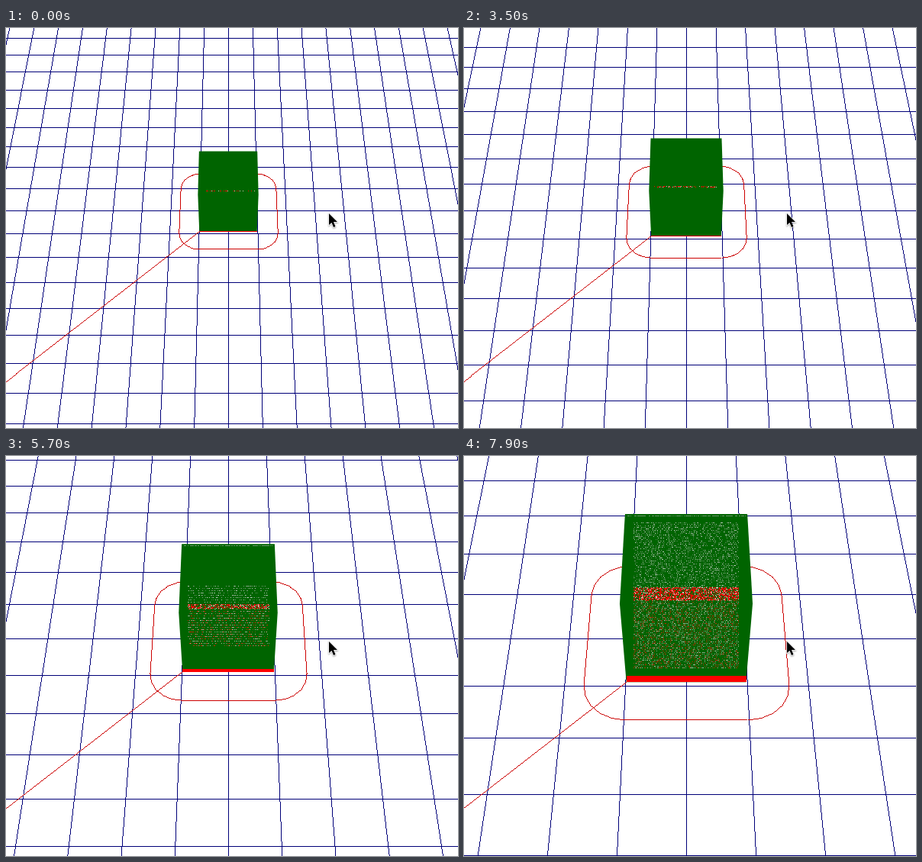
Animation of 592x524 px, one loop 8 s. Source, as an HTML page with a canvas:

```html
<!DOCTYPE html>
<html>
<head>
<meta charset="utf-8">
<style>
html, body { margin: 0; width: 100%; height: 100%; overflow: hidden; background: #fff; }
canvas { display: block; }
</style>
</head>
<body>
<canvas id="stage" width="592" height="524"></canvas>
<script>
const ctx = document.getElementById('stage').getContext('2d');
const CX = 291, CY = 239, FOCAL = 1223, SIN = 0.78, COS = 0.626, FAR = 32.37;
const HALF_X = 0.98, HALF_Y = 0.95, HEIGHT = 2;
const GREEN = '#006400', RED = '#ff0000', PATH = '#cc0000', NAVY = '#000078';
// Spans in which the overlapping layers flicker while the camera rests
const FLICKER = [[300, 800], [2200, 2500], [4500, 5300], [6400, 6500], [6700, 7500]];

let dist;

// Camera distance relative to the start
function zoom(t) {
  const part = (a, b) => Math.min(1, Math.max(0, (t - a) / (b - a)));
  return 1 - 0.2964 * part(2600, 3900) ** 1.456
           - 0.1466 * part(5300, 6200) - 0.065 * part(7500, 7900);
}

function project(x, y, z = 0) {
  const depth = dist + y * COS - z * SIN;
  return [CX + FOCAL * x / depth, CY - FOCAL * (y * SIN + z * COS) / depth];
}

// Line of hard pixels
function line([x0, y0], [x1, y1], color) {
  const dx = x1 - x0, dy = y1 - y0;
  const n = Math.ceil(Math.max(Math.abs(dx), Math.abs(dy), 1));
  ctx.fillStyle = color;
  if (Math.abs(dy) < 0.01) {
    ctx.fillRect(Math.round(x0), Math.round(y0), Math.round(dx), 1);
    return;
  }
  for (let i = 0; i <= n; i++) {
    ctx.fillRect(Math.round(x0 + dx * i / n), Math.round(y0 + dy * i / n), 1, 1);
  }
}

function polygon(points, color) {
  ctx.beginPath();
  points.forEach(p => ctx.lineTo(...p));
  ctx.closePath();
  ctx.fillStyle = color;
  ctx.fill();
}

function noise(x, y, seed) {
  const v = Math.sin(x * 12.9898 + y * 78.233 + seed * 37.719) * 43758.5453;
  return v - Math.floor(v);
}

function drawGrid() {
  for (let i = -10; i <= 10; i++) {
    line(project(i, -10), project(i, 10), NAVY);
    line(project(-10, i), project(10, i), NAVY);
  }
}

function drawSkirt() {
  const points = [], steps = 5, radius = 0.7;
  for (let corner = 0; corner < 4; corner++) {
    const sx = corner === 0 || corner === 3 ? 1 : -1, sy = corner < 2 ? 1 : -1;
    for (let i = 0; i <= steps; i++) {
      const a = (corner + i / steps) * Math.PI / 2;
      points.push(project(sx * 0.98 + radius * Math.cos(a), sy * 0.98 + radius * Math.sin(a), 0.03));
    }
  }
  points.forEach((p, i) => line(p, points[(i + 1) % points.length], PATH));
}

// Row of loose pixels where lower layers show through
function dots(y, left, right, chance, colors, tick) {
  for (let x = Math.round(left); x < right; x++) {
    const seed = noise(x, y, 5) < 0.12 ? tick : 0;
    const v = noise(x, y, seed);
    if (v < chance) {
      ctx.fillStyle = colors[Math.floor(v / chance * colors.length)];
      ctx.fillRect(x, y, 1, 1);
    }
  }
}

function drawBlock(q, tick) {
  const edge = (y, z) => [project(-HALF_X, y, z), project(HALF_X, y, z)];
  const [backL, backR] = edge(HALF_Y, HEIGHT);
  const [topL, topR] = edge(-HALF_Y, HEIGHT);
  const [lowL, lowR] = edge(-HALF_Y, 0.04);
  polygon([backL, backR, topR, lowR, lowL, topL], GREEN);

  const [left, rear] = project(-0.93, HALF_Y);
  const right = 2 * CX - left, base = Math.round(rear) + 1;
  const gap = Math.round(6 - 4 * q);
  const up = Math.max(0, 250 * (q - 0.6)), down = Math.max(0, 140 * (q - 0.33));
  for (let y = base - gap; y > base - up; y -= gap) {
    dots(y, left, right, 0.32, ['#b8c8b8', '#7c9c7c', '#4d804d'], tick);
  }
  for (let y = base + gap; y < base + down; y += gap) {
    dots(y, left, right, 0.45, ['#d02000', '#b0b8a0', '#805020', '#7c9c7c'], tick);
  }
  const strip = Math.round(13 * q ** 4);
  for (let y = base - strip; y <= base + Math.round(3 * q); y++) {
    dots(y, left, right, 0.3 + 0.3 * q, [RED, RED, RED, '#d8c8b8'], tick);
  }
  if (q > 0.5) dots(Math.round(backL[1]) + 2, backL[0] + 3, backR[0] - 3, 0.7, ['#6c946c'], 0);

  const red = Math.round(1 + 7 * q ** 3);
  ctx.fillStyle = RED;
  ctx.fillRect(Math.round(lowL[0]), Math.round(lowL[1]) - red, Math.round(lowR[0] - lowL[0]), red);
}

function drawCursor() {
  ctx.beginPath();
  [[423, 243], [423, 258], [426.5, 255], [429, 261], [431.5, 260], [429, 254], [434, 254]]
    .forEach(p => ctx.lineTo(...p));
  ctx.closePath();
  ctx.save();
  ctx.shadowColor = 'rgba(0,0,0,.4)';
  ctx.shadowBlur = 2;
  ctx.shadowOffsetY = 1;
  ctx.strokeStyle = '#fff';
  ctx.lineWidth = 1.5;
  ctx.stroke();
  ctx.restore();
  ctx.fillStyle = '#000';
  ctx.fill();
}

function draw(t) {
  const scale = zoom(t), q = (1 - scale) / 0.508;
  const flickers = FLICKER.some(([a, b]) => t >= a && t <= b);
  dist = FAR * scale;
  ctx.fillStyle = '#fff';
  ctx.fillRect(0, 0, 592, 524);
  drawGrid();
  drawSkirt();
  line(project(-HALF_X, -HALF_Y, 0.06), project(-10, -9.9), PATH);
  drawBlock(q, flickers ? t / 100 : 0);
  drawCursor();
}

let shown = -1;
function frame() {
  const t = Math.floor(performance.now() % 8000 / 100) * 100;
  if (t !== shown) draw(shown = t);
  requestAnimationFrame(frame);
}
frame();
</script>
</body>
</html>
```
